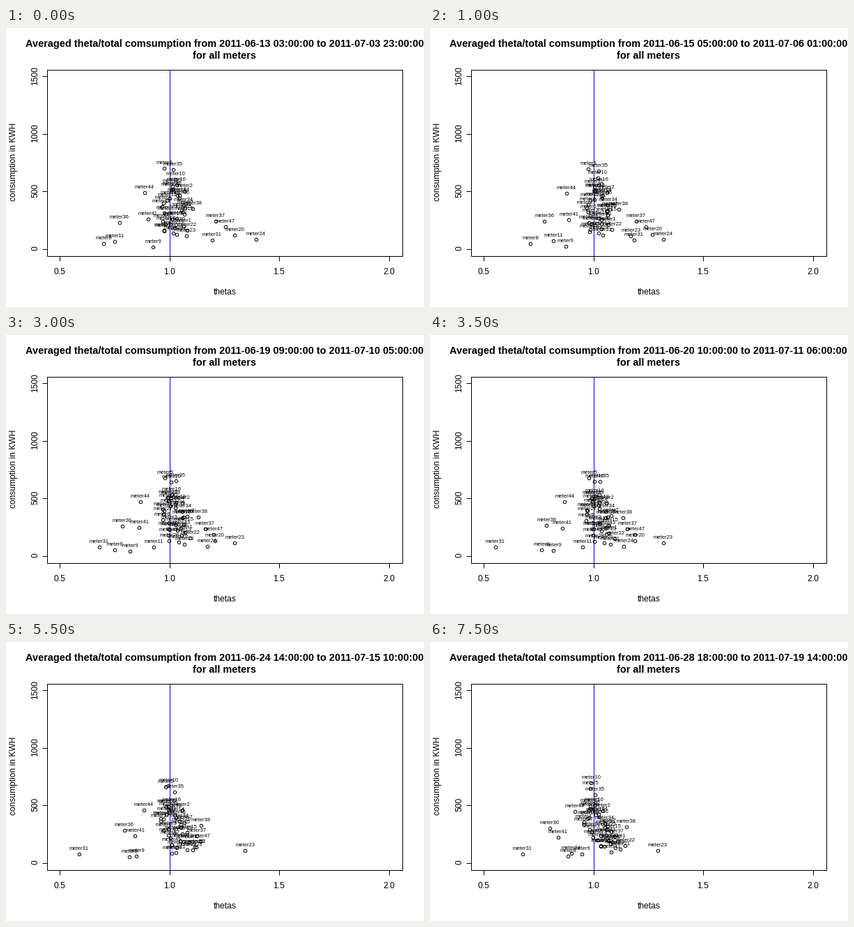
A matplotlib script for the animation above (8 s loop, 600 by 400 pixels).

```python
import matplotlib.pyplot as plt
import numpy as np
from matplotlib.animation import FuncAnimation

W, H, DPI = 600, 400, 100
STEPS, INTERVAL = 16, 500
PX = 72 / DPI  # points per pixel
START = np.datetime64("2011-06-13T03:00:00")

# Meters outside the crowd: x start, x end, y start, y end, bend of x midway
LONERS = {
    5: (227, 230, 201, 210, 0),
    10: (243, 231, 217, 202, -1),
    35: (240, 237, 203, 219, 5),
    44: (199, 208, 236, 243, -10),
    38: (268, 282, 259, 265, 2),
    36: (163, 172, 279, 267, 0),
    41: (204, 184, 274, 280, -5),
    37: (301, 265, 277, 279, -1),
    47: (315, 262, 285, 287, 4),
    20: (328, 245, 297, 293, 5),
    24: (359, 203, 303, 303, -8),
    23: (259, 327, 298, 299, 44),
    11: (156, 260, 306, 301, 15),
    9: (211, 218, 314, 304, -37),
    8: (140, 198, 309, 307, -7),
}
# The other meters, from high to low consumption
CROWD = [16, 32, 39, 42, 2, 18, 14, 33, 46, 12, 4, 34, 27, 7, 26, 25,
         6, 3, 15, 19, 43, 40, 17, 30, 1, 13, 45, 22, 28, 29, 21]

plt.rcParams["font.family"] = "Liberation Sans"
fig = plt.figure(figsize=(W / DPI, H / DPI), dpi=DPI, facecolor="white")
ax = fig.add_axes([0, 0, 1, 1])
ax.set_xlim(0, W)
ax.set_ylim(H, 0)
ax.axis("off")


def line(xs, ys, color="black"):
    # Offsets keep the snapped line on the named pixel row and column
    ax.plot(np.add(xs, 0.2), np.add(ys, 0.8), color=color, lw=PX,
            solid_capstyle="butt", solid_joinstyle="miter")


def label(x, y, text="", size=12, **kw):
    return ax.text(x, y, text, fontsize=size * PX, color="black",
                   ha="center", va="baseline", rotation_mode="anchor", **kw)


def mix(a, b, t):
    return a + (b - a) * t


left, right, top, bottom = 59, 569, 59, 326
line([235, 235], [top, bottom], "blue")
line([left, right, right, left, left], [top, top, bottom, bottom, top])

for i in range(4):
    x = round(77 + 157.7 * i)
    line([x, x], [bottom, bottom + 7])
    label(x, 353, f"{0.5 + 0.5 * i:.1f}")
    y = round(316 - 82.7 * i)
    line([left - 7, left], [y, y])
    label(45, y, str(500 * i), rotation=90)

label(314, 382, "thetas")
label(14, 192, "consumption in KWH", rotation=90)
title = label(313.5, 27, size=14.55, weight="bold")
label(313.5, 44, "for all meters", size=14.55, weight="bold")

meters = [*LONERS, 31, *CROWD]
dots, = ax.plot([], [], "o", ms=4.5 * PX, mfc="none", mec="black", mew=PX)
tags = [label(0, 0, f"meter{n}", size=7.6) for n in meters]

# Low consumers scatter wider and drift right, high ones drift left
rng = np.random.default_rng(6)
depth = np.linspace(0, 1, len(CROWD))
side = rng.uniform(-1, 1, len(CROWD)) * (14 + 8 * depth)
phase = rng.uniform(0, 2 * np.pi, len(CROWD))


def crowd_at(t):
    x = 242 + side + mix(-9, 28, depth**2) * t
    y = mix(mix(226, 298, depth), mix(235, 299, depth), t)
    swing = phase + 2 * np.pi * t
    return x + 2 * np.sin(swing), y + 2 * np.cos(swing)


def loners_at(t):
    x0, x1, y0, y1, bend = np.array(list(LONERS.values())).T
    return mix(x0, x1, t) + bend * 4 * t * (1 - t), mix(y0, y1, t)


def stamp(hours):
    return str(START + np.timedelta64(hours, "h")).replace("T", " ")


def draw(step):
    hours = 25 * step
    title.set_text("Averaged theta/total comsumption from "
                   f"{stamp(hours)} to {stamp(hours + 500)}")
    t = step / (STEPS - 1)
    lx, ly = loners_at(t)
    cx, cy = crowd_at(t)
    # Meter 31 falls away fast, then creeps back
    fall = np.interp(step, [0, 2, 7, 11, 15], [296, 293, 94, 105, 133])
    xs = np.concatenate([lx, [fall], cx])
    ys = np.concatenate([ly, [304], cy])
    dots.set_data(xs, ys)
    for tag, x, y in zip(tags, xs, ys):
        tag.set_position((x, y - 6))
    return [title, dots, *tags]


anim = FuncAnimation(fig, draw, frames=STEPS, interval=INTERVAL,
                     repeat=True, repeat_delay=0, blit=False)
plt.show()
```
